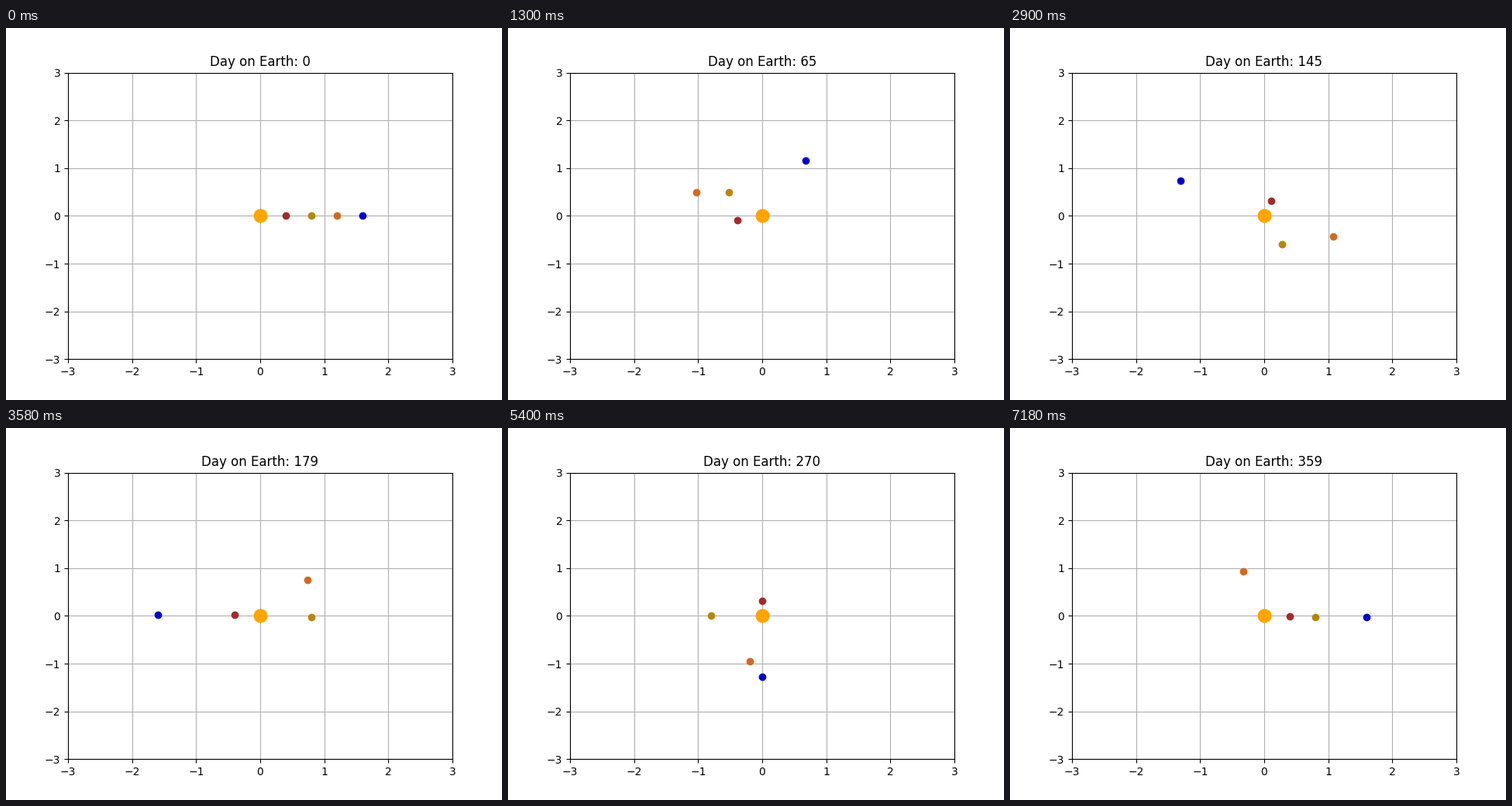
A matplotlib script for the animation above (7.2 s loop, 640x480 px).

```python
import numpy as np
import matplotlib.pyplot as plt
from matplotlib.animation import FuncAnimation

DAYS = 360
FLATTENING = 0.8

# colour, semi-major axis, degrees per day
PLANETS = [
    ("brown", 0.4, 3.0),
    ("darkgoldenrod", 0.8, 2.0),
    ("chocolate", 1.2, 2.3),
    ("mediumblue", 1.6, 1.0),
]

fig, ax = plt.subplots(figsize=(6.4, 4.8), dpi=100)
ax.set_xlim(-3, 3)
ax.set_ylim(-3, 3)
ax.grid(True)
title = ax.set_title("Day on Earth: 0")

ax.plot([0], [0], "o", color="orange", markersize=12)
dots = [ax.plot([a], [0], "o", color=color, markersize=6)[0]
        for color, a, _ in PLANETS]


def update(day):
    for dot, (_, a, speed) in zip(dots, PLANETS):
        angle = np.radians(speed * day)
        dot.set_data([a * np.cos(angle)], [FLATTENING * a * np.sin(angle)])
    title.set_text(f"Day on Earth: {day}")
    return [*dots, title]


anim = FuncAnimation(fig, update, frames=DAYS, interval=20,
                     repeat=True, repeat_delay=0)
plt.show()
```
